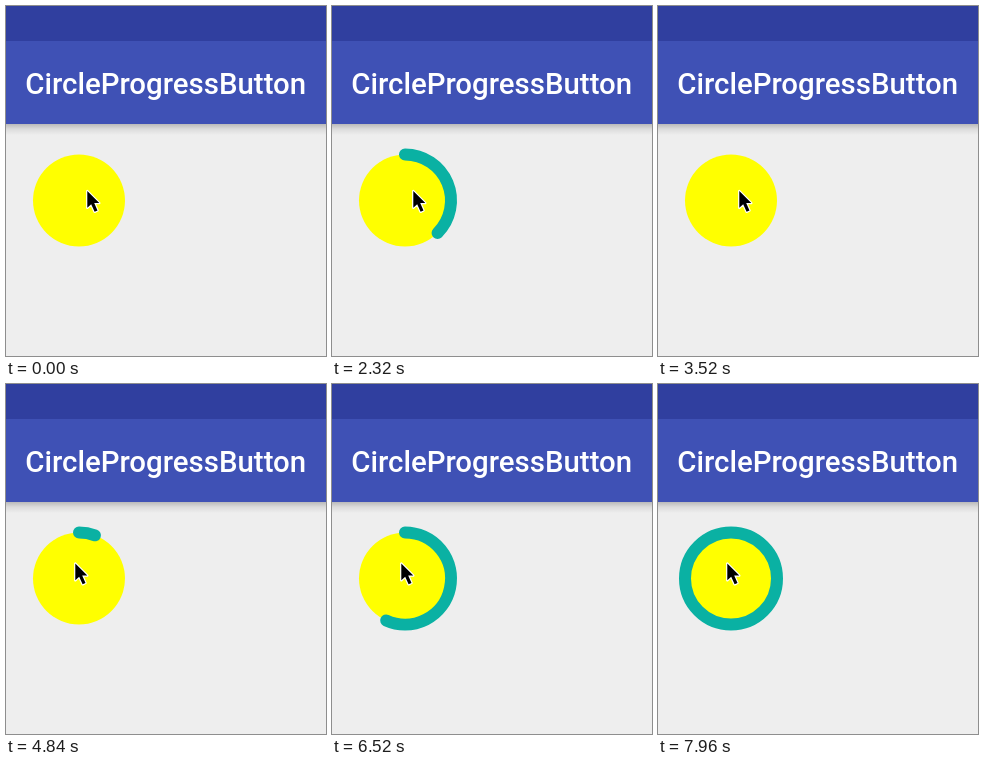
Write an HTML page that moves like this. It is 320 px wide and 350 px high and loops after 8000 ms.

```html
<!DOCTYPE html>
<html lang="en">
<head>
<meta charset="utf-8">
<title>Circle progress button</title>
<style>
  html, body { margin: 0; width: 100%; height: 100%; overflow: hidden; background: #eee; }
  svg { display: block; width: 100%; height: 100%; }
  text { font: 500 29.4px Roboto, sans-serif; fill: #fff; }
</style>
</head>
<body>
<svg viewBox="0 0 320 350">
  <defs>
    <linearGradient id="shade" x2="0" y2="1">
      <stop offset="0" stop-color="#000" stop-opacity=".22"/>
      <stop offset=".45" stop-color="#000" stop-opacity=".08"/>
      <stop offset="1" stop-color="#000" stop-opacity="0"/>
    </linearGradient>
  </defs>
  <rect width="320" height="350" fill="#eee"/>
  <rect y="118" width="320" height="11" fill="url(#shade)"/>
  <rect width="320" height="118" fill="#3f51b5"/>
  <rect width="320" height="35" fill="#303f9f"/>
  <text x="19.3" y="87.5">CircleProgressButton</text>
  <circle cx="73" cy="194.5" r="46" fill="#ff0"/>
  <path id="arc" fill="none" stroke="#0ab1a3" stroke-width="12" stroke-linecap="round"/>
  <path id="cursor" d="M0 0V16.8L3.9 13.2L7.3 20.8L10.2 19.5L6.9 12H12Z"
        fill="#000" stroke="#fff" stroke-width="2.4" stroke-linejoin="round" paint-order="stroke"/>
</svg>
<script>
const LOOP = 8000, STEP = 40;
const CX = 73, CY = 194.5, R = 46;
const arc = document.getElementById('arc');
const cursor = document.getElementById('cursor');

const ramp = (t, t0, t1, a, b) =>
  a + (b - a) * Math.min(1, Math.max(0, (t - t0) / (t1 - t0)));

// Press, early release with rewind, then a second press held until full.
function sweepAt(t) {
  if (t < 1905) return ramp(t, 240, 1905, 0, 182);
  if (t < 4000) return ramp(t, 1905, 3510, 182, 0);
  return ramp(t, 4655, 7943, 0, 360);
}

function arcPath(deg) {
  if (deg <= 0) return '';
  const top = `M${CX} ${CY - R}`;
  if (deg >= 360) return `${top}A${R} ${R} 0 1 1 ${CX} ${CY + R}A${R} ${R} 0 1 1 ${CX} ${CY - R}Z`;
  const a = deg * Math.PI / 180;
  const x = CX + R * Math.sin(a), y = CY - R * Math.cos(a);
  return `${top}A${R} ${R} 0 ${deg > 180 ? 1 : 0} 1 ${x.toFixed(2)} ${y.toFixed(2)}`;
}

function draw(ms) {
  const t = Math.floor(ms % LOOP / STEP) * STEP;
  arc.setAttribute('d', arcPath(sweepAt(t)));
  const x = ramp(t, 4280, 4440, 81.3, 69.3);
  const y = ramp(t, 4280, 4440, 185, 179.5);
  cursor.setAttribute('transform', `translate(${x} ${y})`);
}

const start = performance.now();
function tick() {
  draw(performance.now() - start);
  requestAnimationFrame(tick);
}
tick();
</script>
</body>
</html>
```
